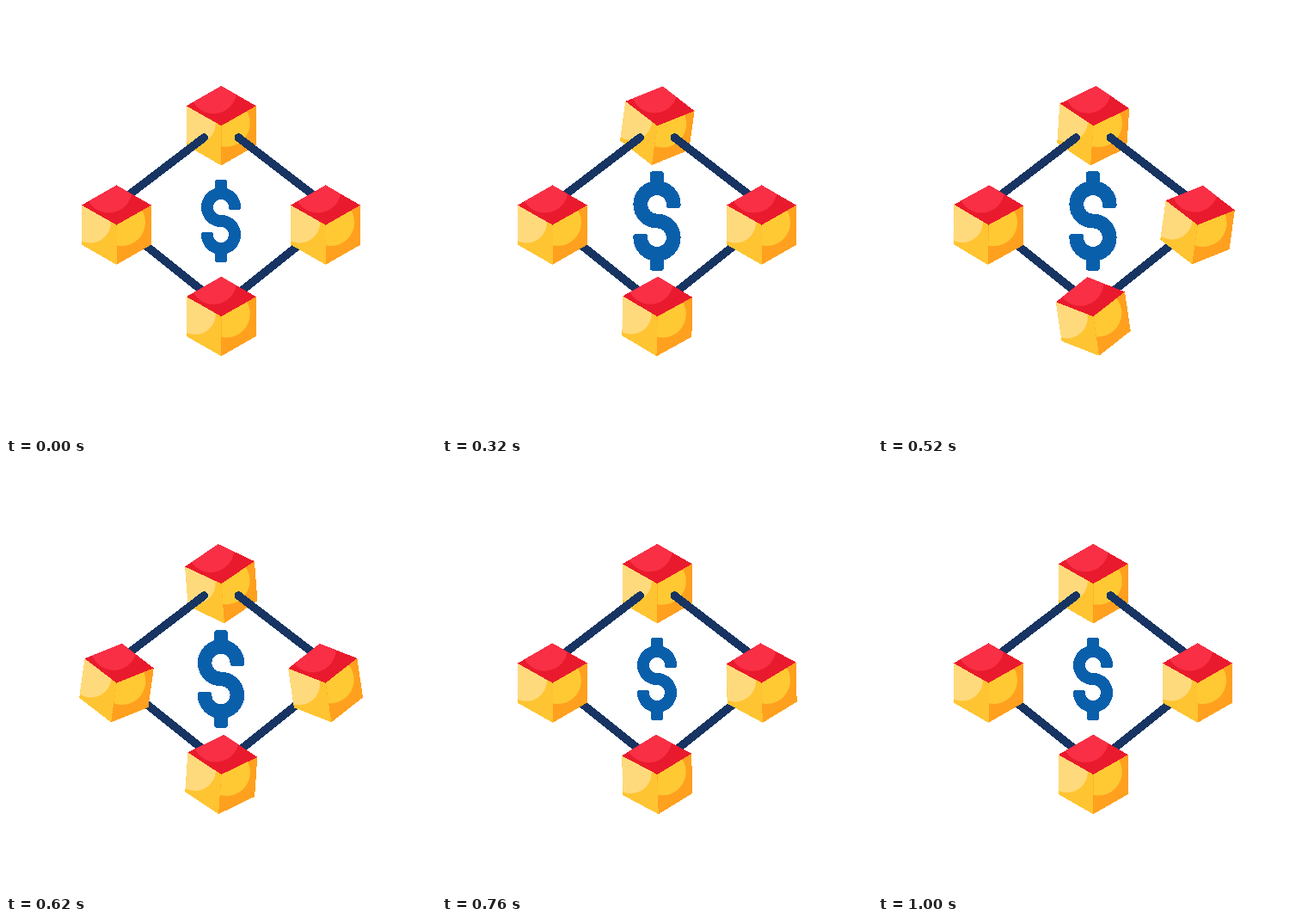
Write an HTML page that moves like this. It is 500 by 500 pixels and loops after 1.2 s.

```html
<!DOCTYPE html>
<html lang="en">
<head>
<meta charset="utf-8">
<title>Block chain</title>
<style>
  html, body { margin: 0; width: 100%; height: 100%; overflow: hidden; background: #fff; }
  svg { display: block; width: 100%; height: 100%; }
  .link { fill: none; stroke: #173462; stroke-width: 9.5; stroke-linecap: round; }
  .coin { fill: #0a5fab; }
  .coin path { fill: none; stroke: #0a5fab; stroke-width: 14; }
  .link, .coin, .hull { shape-rendering: crispEdges; }
</style>
</head>
<body>
<svg viewBox="0 0 500 500">
  <defs>
    <path id="lid" d="M0-46.2 40.5-23 0 0-40.5-23Z"/>
    <path id="left" d="M-40.5-23 0 0V46.2L-40.5 23Z"/>
    <path id="right" d="M40.5-23 0 0V46.2L40.5 23Z"/>
    <clipPath id="clipLid"><use href="#lid"/></clipPath>
    <clipPath id="clipLeft"><use href="#left"/></clipPath>
    <clipPath id="clipRight"><use href="#right"/></clipPath>
    <g id="cube">
      <path class="hull" d="M0-46.2 40.5-23V23L0 46.2-40.5 23V-23Z" fill="#ffc431"/>
      <use class="hull" href="#right" fill="#ffa01e"/>
      <circle cx="6" cy="-3" r="27.5" fill="#ffc933" clip-path="url(#clipRight)"/>
      <use class="hull" href="#left" fill="#ffc431"/>
      <circle cx="-30.5" cy="-3" r="24" fill="#ffda7d" clip-path="url(#clipLeft)"/>
      <use class="hull" href="#lid" fill="#e91a2d"/>
      <circle cx="-9" cy="-41" r="27" fill="#f92f45" clip-path="url(#clipLid)"/>
    </g>
  </defs>

  <path class="link" d="M150.3 268.8 240.3 340.8M351.3 269.3 261.3 341.3"/>
  <use href="#cube" id="top"/>
  <path class="link" d="M230.3 153 132 228M270.3 153 368 228"/>
  <use href="#cube" id="bottom"/>
  <use href="#cube" id="east"/>
  <use href="#cube" id="west"/>

  <g id="coin" class="coin">
    <path d="M16-15V-16A16 16 0 1 0 0 0A16 16 0 1 1-16 16V15"/>
    <rect x="9" y="-19" width="14" height="6.3" rx="2.5"/>
    <rect x="-23" y="12.7" width="14" height="6.3" rx="2.5"/>
    <rect x="-6.7" y="-48" width="13.4" height="16" rx="2.5"/>
    <rect x="-6.7" y="32" width="13.4" height="16" rx="2.5"/>
  </g>
</svg>
<script>
  const LOOP = 1200, STEP = 20, BEAT = 100;
  const SWING = [0, 10, -10, 5, -5, 0];
  const PULSE = [1, 1.2, 1.2, 1.2, 1.2, 1];
  const cubes = [
    { id: 'top', x: 250.3, y: 139.2, start: 200 },
    { id: 'bottom', x: 250.3, y: 361, start: 300 },
    { id: 'east', x: 371.6, y: 254.6, start: 400 },
    { id: 'west', x: 128.5, y: 254.6, start: 500 }
  ];

  const ease = p => p * p * (3 - 2 * p);

  // Eased value of evenly spaced keys, held at both ends.
  function along(keys, time) {
    const pos = Math.min(Math.max(time / BEAT, 0), keys.length - 1);
    const i = Math.min(Math.floor(pos), keys.length - 2);
    return keys[i] + (keys[i + 1] - keys[i]) * ease(pos - i);
  }

  function place(id, transform) {
    document.getElementById(id).setAttribute('transform', transform);
  }

  function draw(time) {
    for (const { id, x, y, start } of cubes) {
      place(id, `translate(${x} ${y}) rotate(${along(SWING, time - start)})`);
    }
    place('coin', `translate(250 250) scale(${along(PULSE, time - 200)})`);
  }

  const origin = performance.now();
  function tick() {
    const time = (performance.now() - origin) % LOOP;
    draw(Math.floor(time / STEP) * STEP);
    requestAnimationFrame(tick);
  }
  tick();
</script>
</body>
</html>
```
